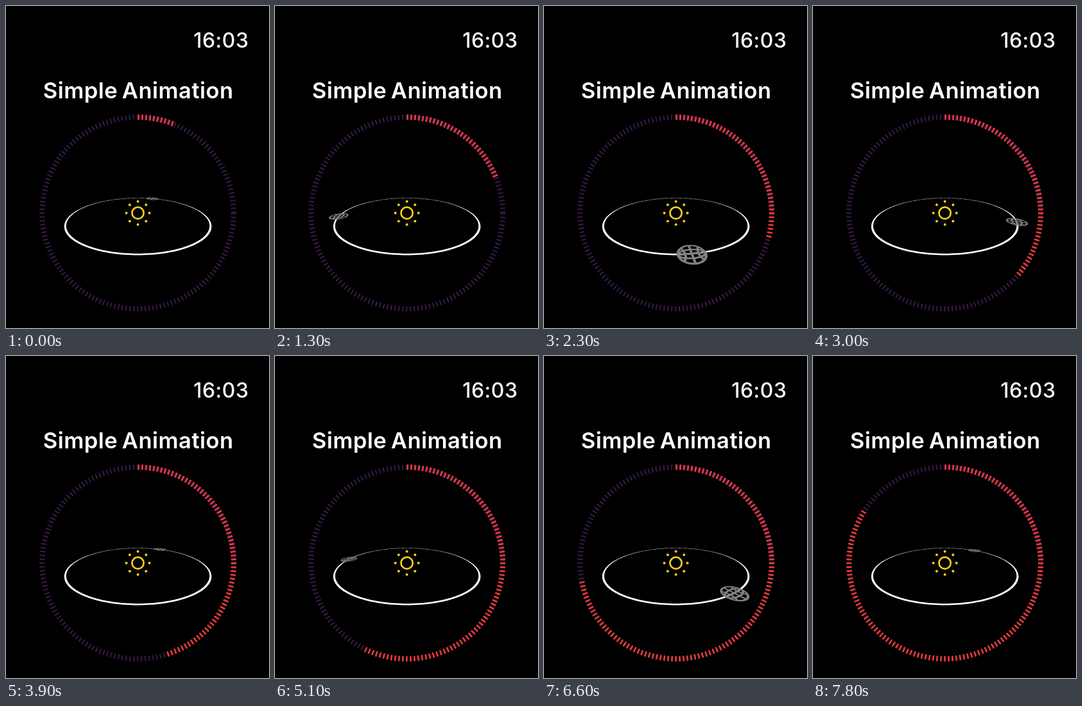
These frames come from a looping animation (410 px wide and 502 px high, 7.9 s). An HTML page:

```html
<!DOCTYPE html>
<html lang="en">
<head>
<meta charset="utf-8">
<title>Simple Animation</title>
<style>
  html, body { margin: 0; width: 100%; height: 100%; overflow: hidden; background: #000; }
  svg { display: block; width: 410px; height: 502px; }
  text { fill: #fff; font-family: Inter, Roboto, sans-serif; letter-spacing: .45px; }
  .clock { font-size: 32px; font-weight: 500; text-anchor: end; }
  .title { font-size: 34.6px; font-weight: 600; word-spacing: -2.5px; text-anchor: middle; }
  .ring { fill: none; stroke-width: 8.2; stroke-dasharray: 2 4; }
  .track { stroke: #391b49; }
  .progress { stroke: #fa3c3a; stroke-dasharray: 2.4 3.6; }
  .orbit { fill: #fff; }
  .globe { fill: #828282; }
  .sun { fill: none; stroke: #fdd015; stroke-width: 2.7; }
  .ray { fill: #fdd015; }
</style>
</head>
<body>
<svg viewBox="0 0 410 502">
  <text class="clock" x="378.4" y="64.8">16:03</text>
  <text class="title" x="206.2" y="144.4">Simple Animation</text>
  <g id="scene" transform="translate(205.6 322.7)">
    <circle class="ring track" r="149.4"/>
    <path class="ring progress" id="progress"/>
    <circle class="sun" r="9.1"/>
  </g>
</svg>
<script>
const LOOP = 7900, STEP = 100;
const RING = 149.4, ORBIT = 100, GLOBE = 11.7;
const TILT = 70 * Math.PI / 180, DEPTH = 200;
const TAU = 2 * Math.PI;
const scene = document.getElementById('scene');
const progress = document.getElementById('progress');

function add(tag, attrs) {
  const el = document.createElementNS('http://www.w3.org/2000/svg', tag);
  for (const key in attrs) el.setAttribute(key, attrs[key]);
  return scene.appendChild(el);
}

// Tilt the flat orbit plane away from the viewer, with perspective.
function project([x, y]) {
  const scale = 1 / (1 - y * Math.sin(TILT) / DEPTH);
  return [x * scale, y * Math.cos(TILT) * scale];
}

// Outline of a curve (u from 0 to 1) stroked in the orbit plane.
function ribbon(curve, width, place = p => p, n = 48) {
  const left = [], right = [], h = 1e-4;
  for (let i = 0; i <= n; i++) {
    const u = i / n;
    const [x, y] = curve(u), [x0, y0] = curve(u - h), [x1, y1] = curve(u + h);
    const k = width / 2 / Math.hypot(x1 - x0, y1 - y0);
    const nx = (y1 - y0) * k, ny = (x0 - x1) * k;
    left.push([x + nx, y + ny]);
    right.unshift([x - nx, y - ny]);
  }
  const points = left.concat(right).map(p =>
    project(place(p)).map(v => v.toFixed(2)).join(' '));
  return 'M' + points.join('L') + 'Z';
}

const ellipse = (rx, ry) => u => [rx * Math.cos(TAU * u), ry * Math.sin(TAU * u)];
const parallel = side => u => {
  const s = 2 * u - 1;
  return [8.6 * s, side * (5.6 + 2.4 * s * s)];
};
const globeCurves = [
  ellipse(GLOBE, GLOBE),
  ellipse(5.6, GLOBE),
  u => [0, GLOBE * (2 * u - 1)],
  u => [GLOBE * (2 * u - 1), 0],
  parallel(1),
  parallel(-1)
];

for (let i = 0; i < 8; i++) {
  const a = i * TAU / 8;
  add('circle', { class: 'ray', r: 2, cx: 18 * Math.cos(a), cy: 18 * Math.sin(a) });
}
add('path', { class: 'orbit', d: ribbon(ellipse(ORBIT, ORBIT), 2.1, undefined, 240) });
const globeParts = globeCurves.map(() => add('path', { class: 'globe' }));

function drawProgress(deg) {
  const a = deg * Math.PI / 180;
  const x = RING * Math.sin(a), y = -RING * Math.cos(a);
  progress.setAttribute('d',
    `M0 ${-RING}A${RING} ${RING} 0 ${deg > 180 ? 1 : 0} 1 ${x} ${y}`);
}

// The globe turns with its orbit, counter-clockwise from the far side,
// its axis along the direction of travel.
function drawGlobe(deg) {
  const a = deg * Math.PI / 180, c = Math.cos(a), s = Math.sin(a);
  const place = ([x, y]) => {
    const out = x - ORBIT;
    return [y * c + out * s, out * c - y * s];
  };
  globeCurves.forEach((curve, i) =>
    globeParts[i].setAttribute('d', ribbon(curve, 2.1, place)));
}

const start = performance.now();
function frame() {
  const elapsed = Math.max(0, performance.now() - start) % LOOP;
  const t = Math.floor(elapsed / STEP) * STEP / 1000;
  drawProgress(22.2 + 36 * t);
  drawGlobe(-18.8 + 89.75 * t);
  requestAnimationFrame(frame);
}
frame();
</script>
</body>
</html>
```
